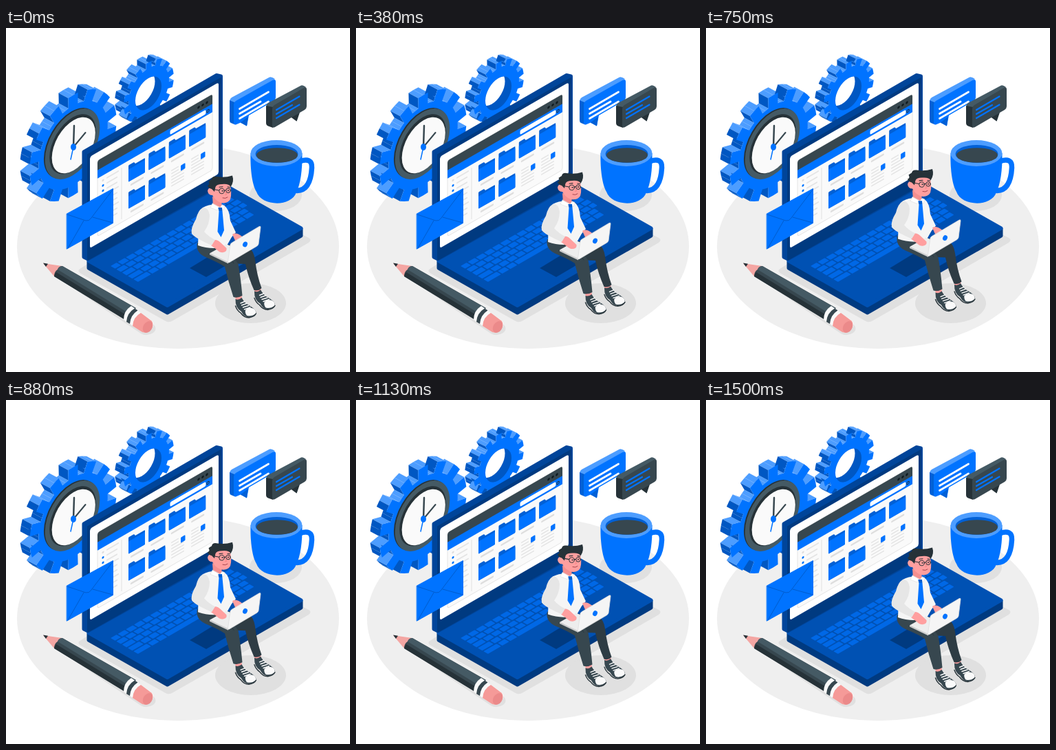
An HTML page that plays this animation: 500 px wide and 500 px high, repeating every 1540 ms.

```html
<!DOCTYPE html>
<html lang="en">
<head>
<meta charset="utf-8">
<title>Working on a laptop</title>
<style>
html,body{margin:0;width:100%;height:100%;overflow:hidden;background:#fff}
svg{display:block;width:100vw;height:100vh}
</style>
</head>
<body>
<svg viewBox="0 0 500 500" stroke-linejoin="round" stroke-linecap="round">
  <ellipse cx="250" cy="317.500" rx="234" ry="148.700" fill="#efefef"/>
  <g fill="#e0e0e0">
    <path d="M106 351Q104 354 109 357L232 426Q237 429 243 425L440 312Q445 308 440 305L430 300L120 342Z"/>
    <ellipse cx="392" cy="243" rx="38" ry="23"/>
    <ellipse cx="355.500" cy="400" rx="51.500" ry="29"/>
    <path d="M66 357L196 444Q204 449 214 443Q221 438 214 430L90 354Z"/>
  </g>

  <g id="gears"></g>
  <g transform="matrix(.866 -.5 0 1 207 95)">
    <clipPath id="hole"><circle r="22"/></clipPath>
    <circle r="22" fill="#0057c2"/>
    <circle r="22" cx="-11" cy="-12" fill="#fff" clip-path="url(#hole)"/>
  </g>
  <g transform="matrix(.866 -.5 0 1 96.500 168.500)">
    <circle r="46" cx="-2" cy="-2" fill="#263238"/>
    <circle r="46" fill="#455a64"/>
    <circle r="39" cx=".5" cy=".5" fill="#263238"/>
    <circle r="36.500" cx="2" cy="3" fill="#fafafa"/>
  </g>
  <g fill="none" stroke="#37474f" stroke-width="2.500">
    <path d="M98 173L99 142"/>
    <path d="M98 173L115.500 152" stroke-width="2"/>
    <path d="M98 173L94 191" stroke="#0073ff" stroke-width="1.500"/>
  </g>
  <ellipse cx="98" cy="173" rx="4" ry="5" fill="#0073ff"/>

  <!-- laptop base -->
  <g stroke-width="5">
    <path d="M120 340V349L234.500 414L429 302V292L234.500 404Z" fill="#003a80" stroke="#003a80"/>
    <path d="M120 338.500L234.500 403.500L429 291L314 226Z" fill="#0051b3" stroke="#0051b3"/>
  </g>
  <g id="keys" transform="matrix(.866 -.5 .866 .5 152 346)" fill="#0068e6"></g>
  <path d="M267 349L291 362L337 335L313 321Z" fill="#003a80"/>

  <!-- lid -->
  <path d="M113 180L306 68.500L312.500 70V228L119 336L113 333Z" fill="#00459a" stroke="#00459a" stroke-width="5"/>
  <path d="M119 184L312 73V228L119 337Z" fill="#003a80" stroke="#003a80" stroke-width="2"/>
  <g id="screen" transform="translate(122 187) skewY(-30)">
    <rect width="187" height="133" rx="3" fill="#fff"/>
    <rect x="11" y="12" width="167" height="110" rx="3" fill="#fafafa" stroke="#e4e4e4"/>
    <path d="M11 27V15Q11 12 14 12H175Q178 12 178 15V27Z" fill="#37474f"/>
    <rect x="11" y="26" width="167" height="12" fill="#0073ff"/>
    <rect x="116.500" y="29" width="52" height="6.500" rx="2" fill="#fff"/>
    <circle cx="171.500" cy="32.500" r="1.800" fill="none" stroke="#263238"/>
    <path d="M46 43V117" stroke="#e0e0e0"/>
  </g>

  <!-- envelope -->
  <path d="M88.500 270L155.500 233.500V283.500L88.500 321Z" fill="#0073ff" stroke="#0073ff"/>
  <path d="M89 271L116 280Q121 281 124 276L155.500 234.500M90 320L113 280M155 283L126 275" fill="none" stroke="#005ccc" stroke-width="1"/>

  <!-- speech bubbles -->
  <path d="M325 106Q325 103 328 101L383 71.500Q386 70.500 391 74L332 109Z" fill="#4d9dff"/>
  <path d="M325 105L332 108V140L327 138Q325 137 325 134Z" fill="#0060d6"/>
  <path d="M331 111Q331 108 334 106L388 75.500Q392 74 392 78V101Q392 104 389 106L353 127L350 142.500L341 137.500L334 140.500Q331 141 331 138Z" fill="#0073ff"/>
  <path d="M341 137.500L350 142.500L352 129Z" fill="#0060d6"/>
  <path d="M339.500 117.500L381.500 93M339.500 124.500L370 107M339.500 131.500L381.500 107" stroke="#fff" stroke-width="2.800"/>
  <path d="M378 114Q378 111 381 109L428 84Q431 82 436 86L389 117Z" fill="#455a64"/>
  <path d="M378 113L388 115V145L381 142.500Q378 141 378 138Z" fill="#263238"/>
  <path d="M387 117Q387 114 390 112L433 87Q437 85 437 89V114Q437 117 434 119L427 123L422.500 135.500L415 130L391 144Q387 146 387 142Z" fill="#37474f"/>
  <path d="M415 130L422.500 135.500L426 124Z" fill="#263238"/>
  <path d="M393 119L426.500 99.500M393 125L416 112M393 131L426.500 111.500" stroke="#0073ff" stroke-width="2.200"/>

  <!-- cup -->
  <path d="M428 193.500C438 190 445 192 444.500 203C443.500 222 438 236 423 236.500" fill="none" stroke="#0073ff" stroke-width="7.500"/>
  <path d="M355.500 182C355 207 358 228 364 238C371 259 414 261 422 239C428 227 431 207 430.500 182Z" fill="#0073ff"/>
  <ellipse cx="393" cy="182" rx="37.500" ry="19" fill="#4d9dff"/>
  <ellipse cx="393.500" cy="183" rx="31" ry="13" fill="#0060d6"/>
  <ellipse cx="394" cy="185" rx="30" ry="10.800" fill="#37474f"/>

  <!-- pencil -->
  <path d="M54 342L82 346L70 361Z" fill="#f4a6a3"/>
  <path d="M54 341.500L61 342.700L58 347Z" fill="#263238"/>
  <path d="M82 346Q77 346 75 351Q70 354 70 361L173 424L189 407Z" fill="#37474f"/>
  <path d="M82 346Q77 346 75 351L179 415L188 407Z" fill="#455a64"/>
  <path d="M70 361Q71 357 73 355L176 418L173 424Z" fill="#263238"/>
  <path d="M182 404L213 426Q217 433 209 440Q203 445 197 441L171 424Q171 411 182 404Z" fill="#fafafa"/>
  <path d="M187 407.500L191.500 410.500Q181 417 180 430L175 427Q176 414 187 407.500Z" fill="#37474f"/>
  <path d="M196 414L212 426Q216 432 209 440Q204 444 198 442L184 433Q185 420 196 414Z" fill="#f59a98"/>
  <ellipse cx="206" cy="434.500" rx="6.500" ry="9" transform="rotate(32 206 434.500)" fill="#eb8a8a"/>

  <g id="man">
    <!-- shoes -->
    <g id="shoe">
      <path d="M331.500 386L342 385L343.500 396L335 398Z" fill="#ff9f9f"/>
      <path d="M333.500 394Q338 396 342.500 392Q347 400 353 403Q362 408 363.500 413Q363 420 353 420.500Q346 420 342 412Q333 407 333.500 394Z" fill="#37474f"/>
      <path d="M348 410Q353 405 360 408Q364 411 363 415Q357 420 350 418Q347 414 348 410Z" fill="#fafafa"/>
      <path d="M333.500 404Q336 411 341 414Q346 421 353 421Q361 420 363.500 415" fill="none" stroke="#263238" stroke-width="1.400"/>
      <path d="M341 400L347 397.500M342.500 403L349.500 400.500M344.500 406L352.500 403.500M346.500 409L355 406" stroke="#fff" stroke-width="1.400"/>
    </g>
    <use href="#shoe" x="27.500" y="-11.500"/>
    <!-- legs -->
    <path d="M298 315Q336 314 352 319Q360 323 362 337Q365 361 371.500 378Q367 383 360.500 381Q352 362 348 343L318 342Z" fill="#2e3c44"/>
    <path d="M278 312Q275 326 290 333Q309 341 318 347Q323 368 330.500 391Q337 393 343.500 389Q341 362 337.500 343Q331 331 312 318Z" fill="#37474f"/>
    <path d="M300 319Q320 325 331 342" fill="none" stroke="#263238" stroke-width=".8"/>
    <!-- body -->
    <path d="M286 261Q299 254 317 258Q325 263 326 280L334 297L328 304L320 318Q298 323 279 316L280 288Z" fill="#f5f5f5"/>
    <path d="M300 245L313 249L314 261Q308 264 301 259Z" fill="#f58f8f"/>
    <path d="M300 255L297 261L307 265L311 261ZM314 257L311 261L316 265L318 259Z" fill="#fff" stroke="#dcdcdc" stroke-width=".6"/>
    <path d="M308.500 261L314 261L314.500 266L317 294L312.500 304L307.500 296L309.500 266Z" fill="#0073ff"/>
    <path d="M308.500 261L314 261L314 265.500H309.500Z" fill="#005ccc"/>
    <path d="M329 300Q334 296 343 303L345 310L333 309Z" fill="#ff9f9f"/>
    <!-- small laptop -->
    <path d="M296 327.500L320 314L347 326L323 341Z" fill="#ededed"/>
    <path d="M296 327.500L323 340V342.500L296 329.500Z" fill="#cfcfcf"/>
    <path d="M299 310Q305 305 312 312L320.500 320Q321.500 325 316 326Q311 327 306 322L298 316Z" fill="#ff9f9f"/>
    <path d="M326 315Q326.500 313 328.500 312L368 288.500Q370.500 287.500 370 290L367 314Q366.500 316 364 317.500L325 340.500Q322 342 322.500 339Z" fill="#f5f5f5" stroke="#dedede" stroke-width=".8"/>
    <ellipse cx="347.500" cy="314.500" rx="3.300" ry="4" transform="rotate(25 347.500 314.500)" fill="#0073ff"/>
    <path d="M286 261Q279 265 276 278Q268 291 270 299Q274 305 299 316L304 308Q294 303 288 296Q296 285 296 272Q294 260 286 261Z" fill="#e6e6e6"/>
    <!-- head -->
    <path d="M299 226Q314 220 325 226Q329 239 326 249Q322 256 312 254Q303 250 300 243Q294 243 293 237Q294 231 299 233Z" fill="#ff9f9f"/>
    <path d="M294.500 223Q297 221 299 220Q300 215 306 216Q318 218 329 214.500Q332 223 326.500 231Q324 226 314 227Q306 227 304.500 231L303 238L299 234Q294 233 293 229Q297 228 294.500 223Z" fill="#263238"/>
    <g fill="none" stroke="#263238">
      <circle cx="313.500" cy="237" r="3.800"/>
      <circle cx="323" cy="236.300" r="3.300"/>
      <path d="M302 234.500L309.500 236M317.300 236H319.700M310 231.300L315 230.700M322 231L325.500 231.500" stroke-width="1.100"/>
      <path d="M315 247Q319 248.500 322 246" stroke="#9c3d45" stroke-width=".9"/>
      <path d="M319 237L320.500 242L318.500 242.500" stroke="#ef7d7d" stroke-width=".8"/>
    </g>
    <g fill="#263238"><circle cx="314.500" cy="236.800" r="1"/><circle cx="323" cy="236.200" r="1"/></g>
  </g>
</svg>
<script>
const $ = id => document.getElementById(id);
const add = (parent, tag, attrs) => {
  const el = document.createElementNS('http://www.w3.org/2000/svg', tag);
  for (const k in attrs) el.setAttribute(k, attrs[k]);
  return parent.appendChild(el);
};
const poly = (parent, pts, fill) => add(parent, 'polygon', {points: pts.map(p => p.join()).join(' '), fill});

// Isometric gear with its visible side walls
function gear(cx, cy, tip, root, count, dx, dy) {
  const g = $('gears'), pts = [], step = 2 * Math.PI / count;
  for (let i = 0; i < count; i++) {
    for (const [r, a] of [[root, -.3], [tip, -.25], [tip, 0], [tip, .25], [root, .3], [root, .5]]) {
      const w = Math.PI / 2 + (i + a) * step, u = r * Math.cos(w), v = r * Math.sin(w);
      pts.push([cx + .866 * u, cy + v - .5 * u]);
    }
  }
  const back = p => [p[0] + dx, p[1] + dy];
  const walls = pts.map((p, i) => {
    const q = pts[(i + 1) % pts.length];
    return {p, q, nx: q[1] - p[1], ny: p[0] - q[0]};
  }).filter(w => w.nx * dx + w.ny * dy > 0);
  walls.sort((a, b) => a.p[0] + a.p[1] - b.p[0] - b.p[1]);
  for (const {p, q, nx, ny} of walls) {
    const up = -ny / Math.hypot(nx, ny);
    const fill = up > .42 ? '#4d9dff' : '#0057c2';
    poly(g, [p, q, back(q), back(p)], fill);
  }
  poly(g, pts, '#0073ff');
}
gear(207.500, 92, 42, 34, 14, -13, -6.5);
gear(97.500, 170.5, 73, 58, 14, -14, -7.5);

// Keyboard rows
for (let row = 0; row < 5; row++) {
  let x = 0;
  for (let i = 0; x < 196; i++) {
    let w = i ? 11.6 : 10 + row * 3;
    if (row === 4 && i === 3) w = 62;
    w = Math.min(w, 203 - x);
    add($('keys'), 'rect', {x, y: row * 9.6, width: w, height: 7.6, rx: 1});
    x += w + 2;
  }
}

// Window contents
const win = $('screen');
const bar = (x, y, width, fill = '#dedede', height = 2.6) => add(win, 'rect', {x, y, width, height, rx: 1, fill});
for (let i = 0; i < 3; i++) add(win, 'circle', {cx: 158 + i * 6, cy: 19.5, r: 1.8, fill: '#0f1b22'});
for (let i = 0; i < 9; i++) {
  const y = 44 + i * 7.5;
  add(win, 'circle', {cx: 19, cy: y + 1.3, r: 1.6, fill: i > 0 && i < 4 ? '#0073ff' : '#dedede'});
  bar(24, y, i % 3 ? 16 : 18, '#e4e4e4', 2);
}
const folder = (x, y) => {
  add(win, 'path', {d: `M${x} ${y + 1}q0-1 1-1h7l2 3h13q1 0 1 1v19q0 1-1 1h-22q-1 0-1-1z`, fill: '#0060d6'});
  add(win, 'path', {d: `M${x} ${y + 6}h24v17q0 1-1 1h-22q-1 0-1-1z`, fill: '#0073ff'});
  bar(x + 3, y + 29, 19);
};
for (let i = 0; i < 6; i++) folder(56 + i % 4 * 29.4, i < 4 ? 45 : 84);
for (const x of [118, 147]) {
  for (let i = 0; i < 6; i++) bar(x, 88 + i * 4.5, i < 2 ? 11 : 19, '#e2e2e2', 1.5);
  bar(x + 14, 89, 6.5, '#0073ff', 8);
}

// Linear float: up ten units and back
const man = $('man');
function draw(ms) {
  const t = Math.min(ms % 1540, 1500);
  const phase = (t + 20) % 1500 / 1500;
  const lift = 10 * (1 - Math.abs(2 * phase - 1));
  man.setAttribute('transform', `translate(0 ${(.27 - lift).toFixed(3)})`);
}
const start = performance.now();
function tick() {
  draw(performance.now() - start);
  requestAnimationFrame(tick);
}
draw(0);
requestAnimationFrame(tick);
</script>
</body>
</html>
```
